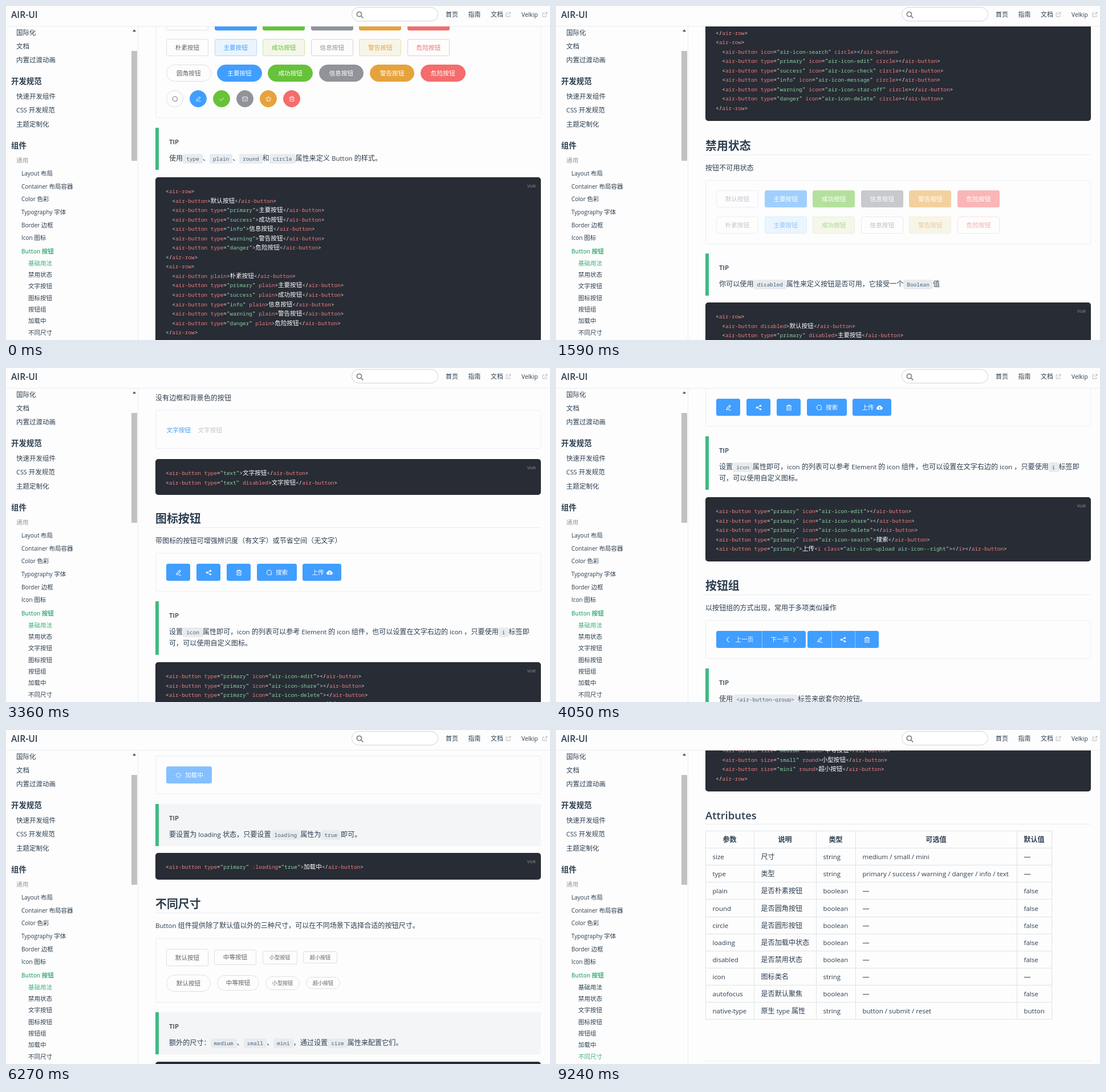
Animation, 954 px wide and 587 px high, one loop 9.95 s. Source, as an HTML page:

```html
<!DOCTYPE html>
<html>
<head>
<meta charset="utf-8">
<title>AIR-UI</title>
<style>
html, body { margin: 0; width: 100%; height: 100%; overflow: hidden; background: #fdfdfd; }
body { position: relative; color: #2c3e50; font: 12.1px "Open Sans", "Noto Sans CJK SC", "Noto Sans CJK", sans-serif; }
div, svg { position: absolute; box-sizing: border-box; }
.text { line-height: 20px; white-space: pre; }
.latin { font-size: .95em; line-height: 0; }
.text code { font: 9.43px "Noto Sans Mono", monospace; line-height: 0; padding: 2px 6px; border-radius: 3px; background: #e9ebed; color: #476582; }
.btn { text-align: center; white-space: pre; border: 1px solid; }
.demo { left: 262px; width: 676px; border: 1px solid #ebeef0; border-radius: 3px; }
.tip { left: 262px; width: 676px; border-left: 6px solid #42b983; }
.code { left: 262px; width: 676px; padding: 17px 18px 0; border-radius: 5px; background: #282c34; color: #e4e4e4; font: 500 9.385px "Noto Sans Mono", "Noto Sans CJK SC", "Noto Sans CJK", monospace; }
.code p { margin: 0; height: 16.56px; line-height: 16.56px; white-space: pre; }
.code b { font-weight: 500; color: #ea7d80; }
.code i { font-style: normal; color: #86d2a2; }
.code em { font-style: normal; font-weight: 400; font-size: 10.55px; line-height: 0; color: #fff; }
#view { left: 232px; top: 36px; right: 0; bottom: 0; overflow: hidden; }
#doc { left: -232px; top: -36px; width: 954px; height: 4000px; }
</style>
</head>
<body>
<div id="view"><div id="doc"></div></div>
<script>
const LOOP = 9950;
const doc = document.getElementById('doc');
let layer = document.body;

const escape = s => s.replace(/</g, '&lt;').replace(/>/g, '&gt;');

function add(cls, css, html = '') {
  const d = document.createElement('div');
  d.className = cls;
  d.style.cssText = css;
  d.innerHTML = html;
  layer.append(d);
  return d;
}
const box = (x, y, w, h, css = '', cls = '', html = '') =>
  add(cls, `left:${x}px;top:${y}px;width:${w}px;height:${h}px;${css}`, html);
const rule = (x, y, w, h, color = '#eaecef') => box(x, y, w, h, `background:${color}`);

// Latin runs are set a little smaller than the CJK beside them.
const rich = s => s.replace(/`([^`]+)`|([ -_a-~]+)/g, (m, code, latin) =>
  code ? `<code>${escape(code)}</code>` : `<span class="latin">${escape(latin)}</span>`);
const text = (x, y, s, css = '') => add('text', `left:${x}px;top:${y - 10}px;${css}`, rich(s));
const centered = (x, y, s, css = '') => text(x - 150, y, s, `width:300px;text-align:center;${css}`);

const ICONS = {
  search: '<circle cx="6" cy="6" r="4.6"/><path d="M9.3 9.3 10.6 10.6"/>',
  edit: '<path d="M2.6 8 7.8 1.5 10 3.2 5 9.6 2.3 10.2ZM6 11H11"/>',
  check: '<path d="M1.5 6 4.8 9.2 10.5 3.2"/>',
  message: '<rect x="1" y="2" width="10" height="8" rx="1"/><path d="M1.5 3.5 6 7 10.5 3.5"/>',
  star: '<path d="M6 .9 7.5 4.2 11.2 4.6 8.5 7.1 9.2 10.8 6 9 2.8 10.8 3.5 7.1 .8 4.6 4.5 4.2Z"/>',
  trash: '<path d="M1 3H11M4 3V1.3H8V3M2.2 3V11H9.8V3M4.8 5.2V8.6M7.2 5.2V8.6"/>',
  share: '<path d="M9 2.6 3 6 9 9.4"/><g fill="currentColor"><circle cx="9.3" cy="2.6" r="1.3"/><circle cx="2.7" cy="6" r="1.3"/><circle cx="9.3" cy="9.4" r="1.3"/></g>',
  left: '<path d="M8 1 3.5 6 8 11"/>',
  right: '<path d="M4 1 8.5 6 4 11"/>',
  cloud: '<path fill="currentColor" d="M3 9.6A2.3 2.3 0 0 1 2.8 5 3.3 3.3 0 0 1 9.2 5 2.3 2.3 0 0 1 9 9.6Z"/><path stroke="#409eff" d="M6 9V5.8M4.6 7 6 5.6 7.4 7"/>',
  loading: '<path d="M6 .5V3M6 9V11.5M.5 6H3M9 6H11.5M2.1 2.1 3.9 3.9M8.1 8.1 9.9 9.9M2.1 9.9 3.9 8.1M8.1 3.9 9.9 2.1"/>',
  out: '<path d="M5 2.6H1.4V10.6H9.4V7M7 1.4H10.6V5M10.6 1.4 5 7"/>',
  find: '<circle cx="5" cy="5" r="3.8"/><path d="M8 8 11.3 11.3"/>'
};
function icon(name, x, y, color = '#fff', size = 11, weight = 1.1) {
  box(x - size / 2, y - size / 2, size, size, `color:${color}`, '',
    `<svg width="${size}" height="${size}" viewBox="0 0 12 12" fill="none" stroke="currentColor" stroke-width="${weight}">${ICONS[name]}</svg>`);
}

// Buttons: a style is [fill, border, text].
const solid = (c, t = '#fff') => [c, c, t];
const BLUE = solid('#409eff');
const PLAIN = ['transparent', '#dcdfe6', '#606266'];
const FADED = ['transparent', '#ebeef5', '#c0c4cc'];
const HUES = ['#409eff', '#67c23a', '#909399', '#e6a23c', '#f56c6c'];
const FULL = [PLAIN, ...HUES.map(c => solid(c))];
const LIGHT = [PLAIN, ['#eaf4fd', '#b3d8ff', HUES[0]], ['#f4f7ea', '#c2e7b0', HUES[1]],
  ['#fdfdfd', '#d3d4d6', HUES[2]], ['#f7f5e8', '#f5dab1', HUES[3]], ['#fdfdfd', '#fbc4c4', HUES[4]]];
const FULL_OFF = [FADED, ...['#a0cfff', '#b3e19d', '#c8c9cc', '#f3d19e', '#fab6b6'].map(c => solid(c))];
const LIGHT_OFF = [FADED, ['#eaf5fd', '#d9ecff', '#8cc5ff'], ['#f4f7ea', '#e1f3d8', '#a4da89'],
  ['#fdfdfd', '#e9e9eb', '#bcbec2'], ['#f7f5e8', '#faecd8', '#f0c78a'], ['#fdfdfd', '#fde2e2', '#f9a7a7']];

function button(x, y, w, h, label, [fill, edge, ink], radius = 3, size = 10.6) {
  box(x, Math.floor(y - h / 2), w, h, `background:${fill};border-color:${edge};color:${ink};border-radius:${radius}px;` +
    `font-size:${size}px;line-height:${h - 2}px`, 'btn', label);
}
const KINDS = [['primary', '主要'], ['success', '成功'], ['info', '信息'], ['warning', '警告'], ['danger', '危险']];
function buttonRow(y, first, styles, w = 74, pitch = 84.6, radius = 3) {
  [first, ...KINDS.map(k => k[1])].forEach((name, i) =>
    button(281 + i * pitch, y, w, 30, name + '按钮', styles[i], radius));
}

// Page blocks
const section = (top, build) => {
  layer = doc;
  layer = box(0, top, 954, 0);
  build();
};
function heading(y, s, css = '') {
  text(262, y, s, `font-size:19.9px;font-weight:700;${css}`);
  rule(262, y + 15, 676, 1);
}
const demo = (y, h) => add('demo', `top:${y}px;height:${h}px`);
function tip(y, lines, tint = 'transparent') {
  add('tip', `top:${y}px;height:${54 + 20 * lines.length}px;background:${tint}`);
  text(286, y + 24.5, 'TIP', 'font-weight:600');
  lines.forEach((s, i) => text(286, y + 53.5 + 20 * i, s));
}
const paint = line => line.replace(/"([^"]*)"|<\/?|[=>]|[a-z:][\w:-]*|[^\x00-\x7f]+/g, (m, value) =>
  value !== undefined ? `"<i>${value}</i>"`
    : /^[<=>]/.test(m) ? escape(m)
    : /^[a-z:]/.test(m) ? `<b>${m}</b>` : `<em>${m}</em>`);
function code(y, lines) {
  add('code', `top:${y}px;height:${30 + 16.56 * lines.length}px`, lines.map(l => `<p>${paint(l)}</p>`).join(''));
  text(914, y + 15, 'vue', 'font-size:9.4px;color:#8b8e93');
}
const tag = (attrs, label = '') => `<air-button${attrs}>${label}</air-button>`;
const wrap = (name, lines) => [`<${name}>`, ...lines.map(l => '  ' + l), `</${name}>`];
const family = (first, extra) => wrap('air-row', [tag(extra, first + '按钮'),
  ...KINDS.map(([k, n]) => tag(` type="${k}"${extra}`, n + '按钮'))]);
const primary = (name, label) => tag(` type="primary" icon="air-icon-${name}"`, label);

section(0, () => {
  demo(-6, 203);
  buttonRow(28, '默认', FULL);
  buttonRow(73, '朴素', LIGHT);
  buttonRow(118, '圆角', FULL, 78.6, 89.2, 15);
  ['search', 'edit', 'check', 'message', 'star', 'trash'].forEach((name, i) => {
    button(281 + i * 41, 163, 30, 30, '', FULL[i], 15);
    icon(name, 296 + i * 41, 163, FULL[i][2], 10.6, 1);
  });
  tip(214, ['使用`type`、`plain`、`round`和`circle`属性来定义 Button 的样式。']);
  const names = ['edit', 'check', 'message', 'star-off', 'delete'];
  code(301, [...family('默认', ''), ...family('朴素', ' plain'), ...family('圆角', ' round'),
    ...wrap('air-row', [tag(' icon="air-icon-search" circle'),
      ...KINDS.map(([k], i) => tag(` type="${k}" icon="air-icon-${names[i]}" circle`))])]);
});

section(659, () => {
  heading(246, '禁用状态');
  text(262, 285, '按钮不可用状态');
  demo(306, 113);
  buttonRow(339, '默认', FULL_OFF);
  buttonRow(385, '朴素', LIGHT_OFF);
  tip(435, ['你可以使用`disabled`属性来定义按钮是否可用，它接受一个`Boolean`值']);
  code(521, [...family('默认', ' disabled'), ...family('朴素', ' plain disabled')]);
});

section(1504, () => {
  heading(14, '文字按钮');
  text(262, 53, '没有边框和背景色的按钮');
  demo(74, 68);
  text(281.5, 108.5, '文字按钮', 'font-size:10.6px;color:#409eff');
  text(336.5, 108.5, '文字按钮', 'font-size:10.6px;color:#c0c4cc');
  code(160, [tag(' type="text"', '文字按钮'), tag(' type="text" disabled', '文字按钮')]);

  heading(265, '图标按钮');
  text(262, 303.5, '带图标的按钮可增强辨识度（有文字）或节省空间（无文字）');
  demo(325, 68);
  ['edit', 'share', 'trash'].forEach((name, i) => {
    button(281 + i * 53, 359, 42.4, 30, '', BLUE);
    icon(name, 302 + i * 53, 359);
  });
  button(439.5, 359, 70.5, 30, '', BLUE);
  icon('search', 461, 359);
  text(473, 359, '搜索', 'font-size:10.6px;color:#fff');
  button(520, 359, 67.5, 30, '', BLUE);
  text(536.5, 359, '上传', 'font-size:10.6px;color:#fff');
  icon('cloud', 567, 359);
  tip(410, ['设置`icon`属性即可，icon 的列表可以参考 Element 的 icon 组件，也可以设置在文字右边的 icon ，只要使用`i`标签即',
    '可，可以使用自定义图标。']);
  code(517, [primary('edit'), primary('share'), primary('delete'), primary('search', '搜索'),
    tag(' type="primary"', '上传<i class="air-icon-upload air-icon--right"></i>')]);
});

section(2143, () => {
  heading(34, '按钮组');
  text(262, 73, '以按钮组的方式出现，常用于多项类似操作');
  demo(94, 68);
  button(281, 128, 157, 30, '', BLUE);
  button(441, 128, 125, 30, '', BLUE);
  [361, 482.5, 524].forEach(x => rule(x, 113, 1, 30, '#8cc5ff'));
  icon('left', 301, 128);
  text(314.5, 128, '上一页', 'font-size:10.6px;color:#fff');
  text(376.5, 128, '下一页', 'font-size:10.6px;color:#fff');
  icon('right', 418, 128);
  ['edit', 'share', 'trash'].forEach((name, i) => icon(name, 462 + i * 41.8, 128));
  tip(179, ['使用`<air-button-group>`标签来嵌套你的按钮。']);
  code(266, [
    ...wrap('air-button-group', [primary('arrow-left', '上一页'),
      tag(' type="primary"', '下一页<i class="air-icon-arrow-right air-icon--right"></i>')]),
    ...wrap('air-button-group', [primary('edit'), primary('share'), primary('delete')])]);
  heading(488, '加载中');
  text(262, 526.5, '点击按钮后进行数据加载操作，在按钮上显示加载状态。');
});

section(2646, () => {
  const tint = '#f3f5f7';
  demo(45, 68);
  button(281, 79, 80, 30, '', solid('#84c0ff'));
  icon('loading', 302, 79);
  text(314, 79, '加载中', 'font-size:10.6px;color:#fff');
  tip(130, ['要设置为 loading 状态，只要设置`loading`属性为`true`即可。'], tint);
  code(216, [tag(' type="primary" :loading="true"', '加载中')]);

  heading(306, '不同尺寸');
  text(262, 344, 'Button 组件提供除了默认值以外的三种尺寸，可以在不同场景下选择合适的按钮尺寸。');
  demo(366, 113);
  const sizes = [['默认', 30, 10.6, 281, 74, 281, 78], ['中等', 27, 10.6, 365, 74, 370, 74],
    ['小型', 24, 9.1, 450, 60.5, 455, 60], ['超小', 21, 9.1, 521, 60, 526, 60]];
  for (const [name, h, size, x, w, roundX, roundW] of sizes) {
    button(x, 400, w, h, name + '按钮', PLAIN, 3, size);
    button(roundX, 445, roundW, h, name + '按钮', PLAIN, 15, size);
  }
  tip(496, ['额外的尺寸：`medium`、`small`、`mini`，通过设置`size`属性来配置它们。'], tint);
  const scale = extra => wrap('air-row', [['', '默认'], [' size="medium"', '中等'], [' size="small"', '小型'],
    [' size="mini"', '超小']].map(([a, n]) => tag(a + extra, n + '按钮')));
  code(583, [...scale(''), ...scale(' round')]);
});

section(3330, () => {
  heading(170, 'Attributes', 'font-size:19.4px;font-weight:600');
  const edges = [262, 347, 456, 525, 808, 869];
  const rows = `参数|说明|类型|可选值|默认值
size|尺寸|string|medium / small / mini|—
type|类型|string|primary / success / warning / danger / info / text|—
plain|是否朴素按钮|boolean|—|false
round|是否圆角按钮|boolean|—|false
circle|是否圆形按钮|boolean|—|false
loading|是否加载中状态|boolean|—|false
disabled|是否禁用状态|boolean|—|false
icon|图标类名|string|—|—
autofocus|是否默认聚焦|boolean|—|false
native-type|原生 type 属性|string|button / submit / reset|button`.split('\n').map(r => r.split('|'));
  const pitch = 30.12, top = 197, line = '#dfe2e5';
  edges.forEach(x => rule(x, top, 1, pitch * rows.length + 1, line));
  for (let r = 0; r <= rows.length; r++) rule(262, Math.round(top + r * pitch), 608, 1, line);
  rows.forEach((cells, r) => cells.forEach((s, c) => {
    const y = top + pitch * (r + .5) + 1;
    if (r) text(edges[c] + 12.5, y, s);
    else centered((edges[c] + edges[c + 1]) / 2, y, s, 'font-weight:700');
  }));
  rule(262, 601, 676, 1);
});

// Header
layer = document.body;
rule(0, 35, 954, 1);
text(9, 15, 'AIR-UI', 'font-size:16.5px;font-weight:600');
box(606, 2, 152, 25, 'border:1px solid #cfd4db;border-radius:13px;background:#fff');
icon('find', 620.5, 15, '#8a8a8a', 13, 1.7);
[[771, '首页'], [810.5, '指南'], [850, '文档'], [904, 'Velkip']].forEach(([x, s]) =>
  text(x, 14.5, s, 'font-size:10.9px'));
icon('out', 880.5, 14.5, '#aaa', 10, 1);
icon('out', 944.5, 14.5, '#aaa', 10, 1);

// Sidebar
rule(231, 36, 1, 551);
box(221.5, 41, 0, 0, 'border:3px solid transparent;border-top:0;border-bottom:4px solid #505050');
rule(220, 79, 10, 193, '#c1c1c1');
const side = (x, y, pitch, size, items, css = '') =>
  items.map((s, i) => text(x, y + i * pitch, s, `font-size:${size}px;${css}`));
const GREEN = '#3eaf7c', INK = '#2c3e50';
side(18, 47, 24.2, 11.5, ['国际化', '文档', '内置过渡动画']);
side(9, 132, 112.5, 13.4, ['开发规范', '组件'], 'font-weight:700');
side(18, 159, 24.3, 11.5, ['快速开发组件', 'CSS 开发规范', '主题定制化']);
side(18, 271, 0, 10.7, ['通用'], 'color:#999');
side(27, 294, 22.65, 10.5, ['Layout 布局', 'Container 布局容器', 'Color 色彩', 'Typography 字体', 'Border 边框', 'Icon 图标']);
side(27, 430.5, 0, 10.5, ['Button 按钮'], `font-weight:600;color:${GREEN}`);
const links = side(39, 451.5, 20.35, 10.5, ['基础用法', '禁用状态', '文字按钮', '图标按钮', '按钮组', '加载中', '不同尺寸']);

// Motion: held steps, each 4 or 5 ticks of 30 ms
const play = (node, frames) => node.animate(
  frames.map(([t, style]) => ({ ...style, offset: t / LOOP, easing: 'step-end' })),
  { duration: LOOP, iterations: Infinity });

const TICKS = '45454544' + '45554545' + '45454545' + '54545444' + '44455454' + '45454555' + '45454544';
const STOPS = [[0, 0], [12, 659], [25, 1504], [36, 2143], [47, 2646], [56, 3330], [57, 3350]];
function scrollAt(step) {
  const i = Math.max(1, STOPS.findIndex(s => s[0] >= step));
  const [a, from] = STOPS[i - 1], [b, to] = STOPS[i];
  return Math.round(from + (to - from) * (step - a) / (b - a));
}
const moveTo = step => ({ transform: `translateY(${-scrollAt(step)}px)` });
const times = [0, 120];
for (const n of TICKS) times.push(times[times.length - 1] + n * 30);
play(doc, [...times.map((t, step) => [t, moveTo(step)]), [LOOP, moveTo(57)]]);

const swap = (node, before, after) =>
  play(node, [[0, { color: before }], [7920, { color: after }], [LOOP, { color: after }]]);
swap(links[0], GREEN, INK);
swap(links[6], INK, GREEN);
</script>
</body>
</html>
```
